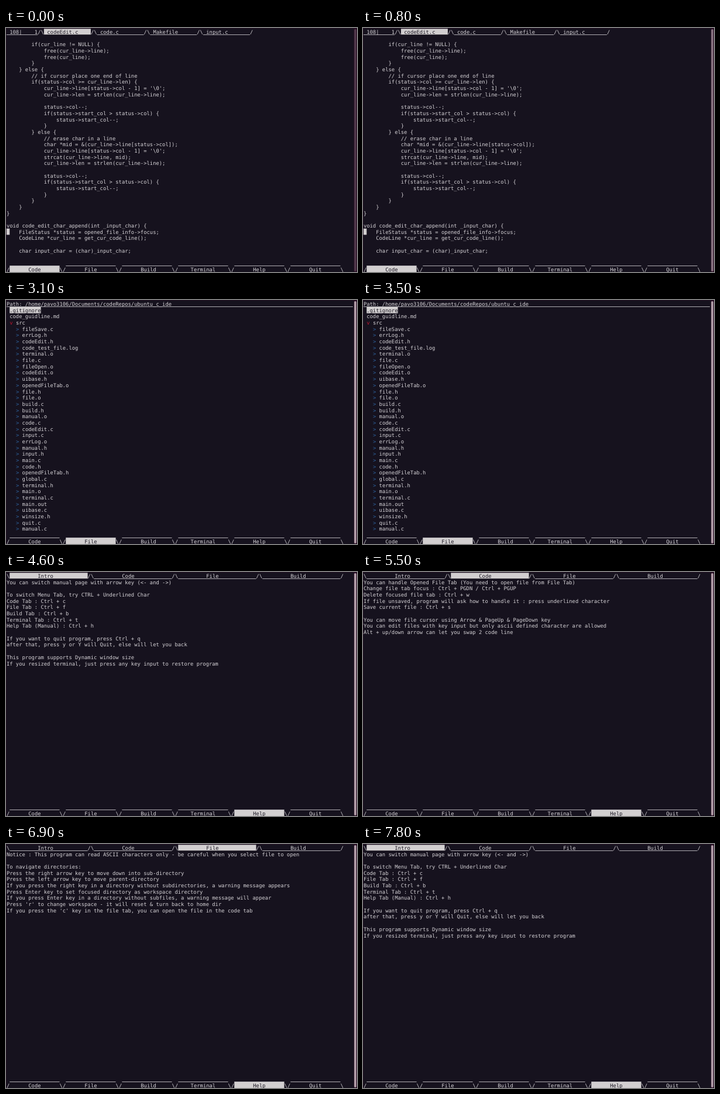
These frames come from a looping animation (600 by 417 pixels, 8000 ms). An HTML page:

```html
<!DOCTYPE html>
<html lang="en">
<head>
<meta charset="utf-8">
<title>Terminal code editor</title>
<style>
  html, body { margin: 0; width: 100%; height: 100%; overflow: hidden; background: #300a24; }
  svg { display: block; width: 600px; height: 417px; }
  text {
    font: 8.86px "DejaVu Sans Mono", "Noto Sans Mono", monospace;
    white-space: pre;
    text-rendering: geometricPrecision;
  }
</style>
</head>
<body>
<svg id="stage" viewBox="0 0 600 417">
  <rect width="600" height="417" fill="#260d22"/>
  <rect x=".6" y=".6" width="594" height="417" fill="#16121e"/>
  <rect id="scrollbar" x="595.2" y="2" width="3.6" height="414" rx="1.8" fill="#b5a0ab"/>
</svg>
<script>
const LOOP = 8000, COL = 5.334, ROW = 10.67, LEFT = 0.9, TOP = 1.3;
const BASELINE = 8.82, UNDERLINE = 9.9;
const FG = "#d6d3d7", DARK = "#1d1924", LIT = "#d2cfd0", RED = "#c4152f", BLUE = "#2d639f";
const stage = document.getElementById("stage");
const scrollbar = document.getElementById("scrollbar");

const colX = col => LEFT + col * COL;
const rowY = row => TOP + row * ROW;

function add(parent, tag, attrs, content) {
  const node = document.createElementNS("http://www.w3.org/2000/svg", tag);
  for (const key in attrs) node.setAttribute(key, attrs[key]);
  if (content) node.textContent = content;
  parent.append(node);
  return node;
}

function print(parent, row, col, content, fill = FG) {
  if (content) add(parent, "text", { x: colX(col), y: rowY(row) + BASELINE, fill }, content);
}

const printBlock = (parent, row, block) =>
  block.split("\n").forEach((line, i) => print(parent, row + i, 0, line));

const fillCells = (parent, row, col, count) =>
  add(parent, "rect", { x: colX(col), y: rowY(row), width: count * COL, height: ROW, fill: LIT });

const underline = (parent, row, col, count, fill = FG) =>
  add(parent, "rect", { x: colX(col), y: rowY(row) + UNDERLINE, width: count * COL, height: 0.8, fill });

// A row of equally wide tabs whose tops hang from the upper edge
function topTabs(parent, labels, active, start, width, indent) {
  labels.forEach((label, i) => {
    const col = start + i * (width + 2);
    const lit = i === active;
    const ink = lit ? DARK : FG;
    if (lit) fillCells(parent, 0, col, width);
    underline(parent, 0, col, width, ink);
    print(parent, 0, col - 1, "\\");
    print(parent, 0, col + indent, label, ink);
    print(parent, 0, col + width, "/");
  });
}

function menu(parent, active) {
  ["Code", "File", "Build", "Terminal", "Help", "Quit"].forEach((label, i) => {
    const col = 1 + i * 18;
    const lit = label === active;
    underline(parent, 37, col, 16);
    if (lit) fillCells(parent, 38, col, 16);
    print(parent, 38, col - 1, "/");
    print(parent, 38, col + 8 - (label.length >> 1), label, lit ? DARK : FG);
    print(parent, 38, col + 16, "\\");
  });
}

function screen(tab) {
  const group = add(stage, "g", { visibility: "hidden" });
  menu(group, tab);
  return group;
}

function codeScreen() {
  const group = screen("Code");
  print(group, 0, 0, " 108|    1");
  underline(group, 0, 0, 10);
  print(group, 0, 10, "/");
  topTabs(group, ["codeEdit.c", "code.c", "Makefile", "input.c"], 0, 12, 15, 1);
  fillCells(group, 32, 0, 1);
  printBlock(group, 2, String.raw`        if(cur_line != NULL) {
            free(cur_line->line);
            free(cur_line);
        }
    } else {
        // if cursor place one end of line
        if(status->col >= cur_line->len) {
            cur_line->line[status->col - 1] = '\0';
            cur_line->len = strlen(cur_line->line);

            status->col--;
            if(status->start_col > status->col) {
                status->start_col--;
            }
        } else {
            // erase char in a line
            char *mid = &(cur_line->line[status->col]);
            cur_line->line[status->col - 1] = '\0';
            strcat(cur_line->line, mid);
            cur_line->len = strlen(cur_line->line);

            status->col--;
            if(status->start_col > status->col) {
                status->start_col--;
            }
        }
    }
}

void code_edit_char_append(int _input_char) {
    FileStatus *status = opened_file_info->focus;
    CodeLine *cur_line = get_cur_code_line();

    char input_char = (char)_input_char;`);
  return group;
}

function fileScreen() {
  const group = screen("File");
  print(group, 0, 0, "Path: /home/pavo3106/Documents/codeRepos/ubuntu_c_ide");
  underline(group, 0, 0, 111);
  fillCells(group, 1, 1, 10);
  print(group, 1, 1, ".gitignore", DARK);
  print(group, 2, 1, "code_guidline.md");
  print(group, 3, 1, "v", RED);
  print(group, 3, 3, "src");
  const files = `fileSave.c errLog.h codeEdit.h code_test_file.log terminal.o file.c fileOpen.o
    codeEdit.o uibase.h openedFileTab.o file.h file.o build.c build.h manual.o code.c
    codeEdit.c input.c errLog.o manual.h input.h main.c code.h openedFileTab.h global.c
    terminal.h main.o terminal.c main.out uibase.c winsize.h quit.c manual.c`;
  files.split(/\s+/).forEach((name, i) => {
    print(group, 4 + i, 3, ">", BLUE);
    print(group, 4 + i, 5, name);
  });
  return group;
}

function helpScreen(page, block) {
  const group = screen("Help");
  topTabs(group, ["Intro", "Code", "File", "Build"], page, 1, 25, 9);
  printBlock(group, 1, block);
  return group;
}

const code = codeScreen();
const files = fileScreen();
const helpIntro = helpScreen(0, `You can switch manual page with arrow key (<- and ->)

To switch Menu Tab, try CTRL + Underlined Char
Code Tab : Ctrl + c
File Tab : Ctrl + f
Build Tab : Ctrl + b
Terminal Tab : Ctrl + t
Help Tab (Manual) : Ctrl + h

If you want to quit program, press Ctrl + q
after that, press y or Y will Quit, else will let you back

This program supports Dynamic window size
If you resized terminal, just press any key input to restore program`);
const helpCode = helpScreen(1, `You can handle Opened File Tab (You need to open file from File Tab)
Change file tab focus : Ctrl + PGDN / Ctrl + PGUP
Delete focused file tab : Ctrl + w
If file unsaved, program will ask how to handle it : press underlined character
Save current file : Ctrl + s

You can move file cursor using Arrow & PageUp & PageDown key
You can edit files with key input but only ascii defined character are allowed
Alt + up/down arrow can let you swap 2 code line`);
const helpFile = helpScreen(2, `Notice : This program can read ASCII characters only - be careful when you select file to open

To navigate directories:
Press the right arrow key to move down into sub-directory
Press the left arrow key to move parent-directory
If you press the right key in a directory without subdirectories, a warning message appears
Press Enter key to set focused directory as workspace directory
If you press Enter key in a directory without subfiles, a warning message will appear
Press 'r' to change workspace - it will reset & turn back to home dir
If you press the 'c' key in the file tab, you can open the file in the code tab`);
const helpBuild = helpScreen(3, "");

const timeline = [
  [0, code], [2400, files], [4600, helpIntro], [5500, helpCode],
  [6300, helpFile], [7000, helpBuild], [7500, helpIntro]
];
const screens = new Set(timeline.map(([, group]) => group));

function draw(t) {
  const current = timeline.filter(([start]) => start <= t).pop()[1];
  for (const group of screens) {
    group.setAttribute("visibility", group === current ? "visible" : "hidden");
  }
  const fade = Math.min(1, Math.max(0, (t - 400) / 700));
  scrollbar.setAttribute("opacity", 0.3 + 0.7 * fade);
}

function tick() {
  draw(performance.now() % LOOP);
  requestAnimationFrame(tick);
}
tick();
</script>
</body>
</html>
```
